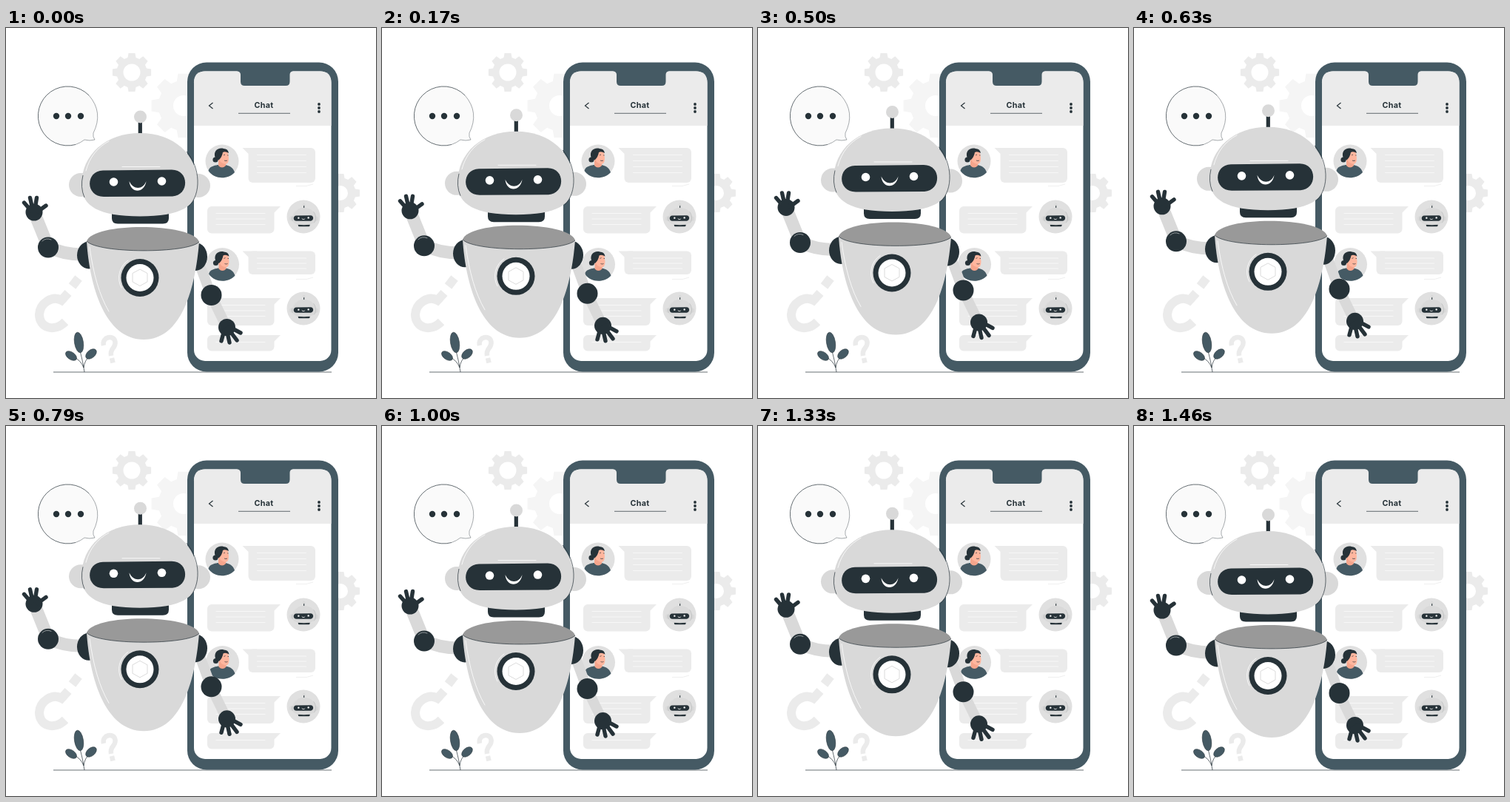
Recreate the animation shown at these times as an HTML page. Size 500 px wide and 500 px high, loop 1500 ms.

```html
<!DOCTYPE html>
<html lang="en">
<head>
<meta charset="utf-8">
<title>Chat robot</title>
<style>
html, body { margin: 0; height: 100%; overflow: hidden; background: #fff; }
svg { display: block; width: 100vw; height: 100vh; }
.dark { fill: #263238; }
.slate { fill: #455a64; }
.pale { fill: #ebebeb; }
.metal { fill: #d9d9d9; }
.white { fill: #fff; }
.line { fill: none; stroke: #263238; stroke-width: .7; }
.shine { fill: none; stroke: #fff; stroke-width: .8; stroke-linecap: round; }
.arm { fill: none; stroke: #d9d9d9; stroke-width: 17; }
.finger { fill: none; stroke: #263238; stroke-width: 5.4; stroke-linecap: round; }
.mark { fill: none; stroke: #ebebeb; }
text { font: 700 10.7px Inter, "Open Sans", sans-serif; letter-spacing: .35px; text-anchor: middle; }
</style>
</head>
<body>
<svg viewBox="0 0 500 500">
  <defs>
    <g id="head">
      <path d="M181.300 124V145" stroke="#263238" stroke-width="5.200"/>
      <circle class="metal" cx="181.500" cy="120" r="8.500"/>
      <circle class="metal" cx="101" cy="212" r="16"/>
      <circle class="metal" cx="260" cy="213" r="16"/>
      <path class="dark" d="M143 251H220V257Q220 264.500 212 264.500H151Q143 264.500 143 257Z"/>
      <path class="metal" d="M102 212C102 170 136 142 181 142S259 170 259 212C259 241 236 254.500 181 254.500S102 241 102 212Z"/>
      <path class="line" d="M244 167C263 189 264 224 247 241M104 199Q100 215 106 229"/>
      <path class="shine" d="M108 193C113 174 124 161 139 153M157 187.500H208"/>
      <path class="dark" d="M131 192.500L224 191.500C248 191.500 248 226 225 227.500L132 228C107 228 107 193 131 192.500Z"/>
      <circle class="white" cx="145.500" cy="208" r="5.800"/>
      <circle class="white" cx="210.500" cy="207" r="5.800"/>
      <path class="white" d="M166.500 207C168 224 187 224 189.500 207C185 219 172 219 166.500 207Z"/>
    </g>
    <g id="user">
      <circle r="22.500" fill="#e0e0e0"/>
      <path class="slate" d="M-18.500 13C-17 7-11 6-6 5H4C11 6 15 9 17 15C8 25-10 25-18.500 13Z"/>
      <circle class="dark" cx="-9" cy="-2" r="3.600"/>
      <path d="M-5-4H5V6Q0 11-5 6Z" fill="#f5a58c"/>
      <path d="M-4-12Q4-17 8-12L9-4Q9 4 4 4Q-3 2-5-4Z" fill="#ffb69e"/>
      <path class="dark" d="M-9-4C-13-14-5-19 2-17Q8-17 9-11Q4-14 1-12Q0-6-4-2Q-7-1-9-4Z"/>
      <path class="line" d="M2-8L4-9M7-8L8.500-8M3-1Q5 0 7-1"/>
    </g>
    <g id="bot">
      <circle cx="402" cy="255" r="22.500" fill="#e0e0e0"/>
      <use href="#head" transform="translate(365.500 214) scale(.205)"/>
    </g>
  </defs>

  <g id="gears"></g>

  <g class="mark">
    <path stroke-width="12" d="M84 358L75 368C62 361 46 372 45 387C45 405 65 412 80 397"/>
    <path stroke-width="12" d="M98 338L89.500 349"/>
    <path stroke-width="6.500" d="M132 429C129 417 146 414 147.500 424C149 433 140 432 142 443"/>
    <path stroke-width="6.500" d="M143 446L144.500 452.500"/>
  </g>

  <path class="line" d="M64 465H440"/>
  <path class="line" d="M106 465Q104 451 100 436M105 459Q101 449 92 445M105 459Q106 449 114 442"/>
  <g class="slate" stroke="#263238" stroke-width=".5">
    <ellipse rx="6" ry="14" transform="translate(98.500 425) rotate(-9)"/>
    <ellipse rx="8.500" ry="5" transform="translate(88 443) rotate(35)"/>
    <ellipse rx="8.500" ry="5.300" transform="translate(115 440.500) rotate(-40)"/>
  </g>

  <path d="M118 142C136 110 114 79 83.500 79C61 79 43.500 97 43.500 119S61 159 83.500 159C92 159 100 156 106 151Q113 153 120 151Q117 147 118 142Z" fill="#fafafa"/>
  <path class="line" d="M112 91A40 40 0 1 0 94 157.500"/>
  <path class="line" style="stroke-width:.4" d="M112 91Q132 114 118 142Q117 147 120 151Q113 153 106 151Q101 155 94 157.500"/>
  <g class="dark"><circle cx="68" cy="119" r="4.200"/><circle cx="84" cy="119" r="4.200"/><circle cx="101" cy="119" r="4.200"/></g>

  <rect class="slate" x="245" y="46.500" width="204" height="418" rx="26"/>
  <rect class="white" x="254" y="58.500" width="185.500" height="391.500" rx="15"/>
  <path class="pale" d="M254 132V73.500Q254 58.500 269 58.500H424.500Q439.500 58.500 439.500 73.500V132Z"/>
  <path class="slate" d="M312 58H388Q383.500 59 383.500 63V72.500Q383.500 78 378 78H322.500Q317 78 317 72.500V63Q317 59 312 58Z"/>
  <path class="line" style="stroke-width:1.200" d="M279.500 101L274.500 105L279.500 109"/>
  <text class="dark" x="348.500" y="108.300">Chat</text>
  <path class="line" d="M314 115.300H384"/>
  <g class="dark"><circle cx="423" cy="103" r="1.900"/><circle cx="423" cy="108" r="1.900"/><circle cx="423" cy="113" r="1.900"/></g>
  <g id="bubbles"></g>
  <path d="M392 213.500H406L415 211M392 339.500H406L415 337" fill="none" stroke="#ebebeb" stroke-width=".8"/>
  <use href="#user" x="292" y="180"/>
  <use href="#user" x="292.500" y="319.500"/>
  <use href="#bot"/>
  <use href="#bot" y="124"/>

  <g id="robot">
    <path class="arm" d="M102 306Q78 306 57 296L40 254"/>
    <path class="arm" style="stroke-width:14" d="M262 320L277 361L298 404"/>
    <ellipse class="dark" cx="112" cy="307" rx="16" ry="18.500"/>
    <ellipse class="dark" cx="256" cy="309" rx="16" ry="19"/>
    <circle class="dark" cx="57" cy="296.500" r="14"/>
    <circle class="dark" cx="277.500" cy="361" r="14"/>
    <path class="shine" style="stroke-width:.5" d="M49 288Q54 283 61 286"/>
    <circle class="dark" cx="38" cy="249" r="11.500"/>
    <path class="finger" d="M34 247L24.500 236M36 245L32.500 229.500M39 245L41.500 229.500M43 248L54 240"/>
    <circle class="dark" cx="298.500" cy="404.500" r="11.500"/>
    <path class="finger" d="M295 408L291 423M298 407L302 425M300 406L312 422M302 404L317 412"/>
    <path class="metal" d="M109 288C113 350 134 421 186 421S256 350 261 289Z"/>
    <path d="M109 288C118 262 252 263 261 289C246 305 124 305 109 288Z" fill="#999"/>
    <path class="line" d="M109 288C124 305 246 305 261 289"/>
    <path class="shine" d="M113 296C118 332 126 361 139 383M156 351A28 28 0 0 1 165 314"/>
    <circle class="dark" cx="181" cy="337.500" r="25.500"/>
    <circle class="white" cx="181" cy="337.500" r="18.500"/>
    <path d="M181 326L191 331.500V343L181 348.500L171 343V331.500Z" fill="none" stroke="#ccc" stroke-width=".7"/>
    <use href="#head"/>
  </g>
</svg>
<script>
const byId = id => document.getElementById(id);

function gear(cx, cy, radius, hole, color) {
  const teeth = 8, points = [];
  for (let i = 0; i < teeth; i++) {
    for (const [offset, scale] of [[-.27, .78], [-.17, 1], [.17, 1], [.27, .78]]) {
      const angle = (i / teeth) * 2 * Math.PI + offset;
      points.push([cx + radius * scale * Math.cos(angle), cy + radius * scale * Math.sin(angle)]);
    }
  }
  return `<polygon points="${points.join(" ")}" fill="${color}"/>
    <circle class="white" cx="${cx}" cy="${cy}" r="${hole}"/>`;
}

function bubble(x, y, height, tailSide, lines, step) {
  const tail = tailSide < 0 ? `M${x + 12} ${y}H${x - 8}L${x} ${y + 8}Z` : `M${x + 78} ${y}H${x + 99}L${x + 90} ${y + 9}Z`;
  let rules = "";
  for (let i = 0; i < lines; i++) rules += `M${x + 12} ${y + 9.5 + i * step}h66`;
  return `<rect class="pale" x="${x}" y="${y}" width="90.500" height="${height}" rx="6"/>
    <path class="pale" d="${tail}"/><path class="shine" style="stroke-width:.6" d="${rules}"/>`;
}

byId("gears").innerHTML =
  gear(240, 105, 44, 14, "#f5f5f5") +
  gear(170, 60, 26.5, 11.5, "#ebebeb") +
  gear(452, 223, 26.5, 10, "#ebebeb");

byId("bubbles").innerHTML =
  bubble(327.5, 162, 47, -1, 4, 8) +
  bubble(272, 241, 36.5, 1, 3, 7.5) +
  bubble(327.5, 301.5, 31.5, -1, 3, 7) +
  bubble(272, 365, 37, 1, 3, 7.5) +
  bubble(272, 415, 21.5, 1, 1, 7);

const LOOP = 1500, STEPS = 36, LIFT = 9.5;
const robot = byId("robot");

// Linear rise and fall; the last step rests where the first begins.
function draw(now) {
  const step = Math.floor(((now + 5) % LOOP) / LOOP * STEPS);
  const y = LIFT * (Math.abs(2 * step / (STEPS - 1) - 1) - 1);
  robot.setAttribute("transform", `translate(0 ${y.toFixed(2)})`);
  requestAnimationFrame(draw);
}
draw(0);
</script>
</body>
</html>
```
